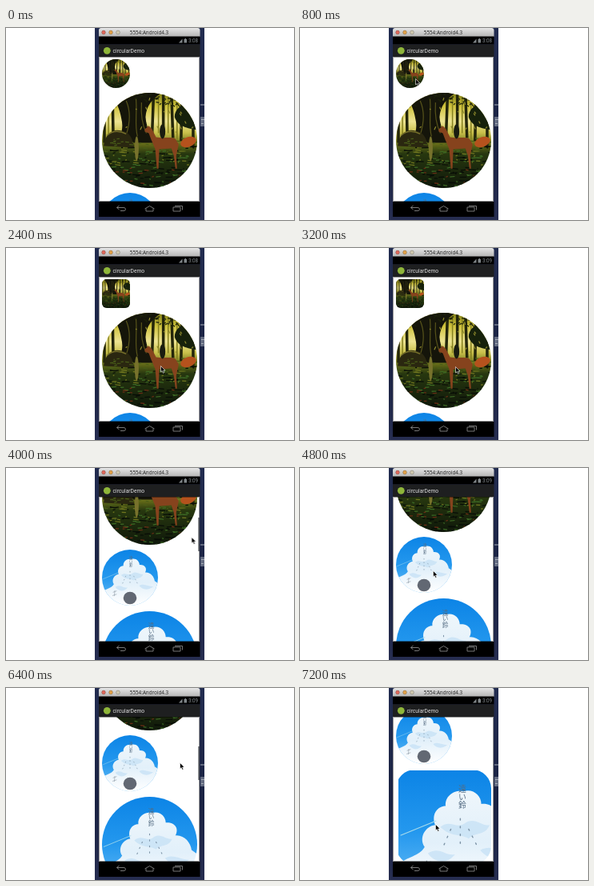
These frames come from a looping animation (360 by 240 pixels, 8000 ms). An HTML page:

```html
<!DOCTYPE html>
<html lang="en">
<head>
<meta charset="utf-8">
<title>circularDemo</title>
<style>
  html, body { margin: 0; width: 100%; height: 100%; overflow: hidden; background: #fff; }
  #stage { position: relative; width: 360px; height: 240px; overflow: hidden; }
  #stage > *, .pic, #list { position: absolute; }
  svg { display: block; }
  #desk { left: 111px; top: 0; width: 137px; height: 240px; background: linear-gradient(#222c50, #1a2242 60%, #262d50); }
  #view { left: 116px; top: 36px; width: 126px; height: 181px; overflow: hidden; background: #fff; }
  #list { left: 0; top: 0; }
  .pic { overflow: hidden; border-radius: 50%; }
  .pic svg { width: 100%; height: 100%; }
  .s1 { left: 4px; top: 3px; width: 35px; height: 36px; }
  .s2 { left: 4px; top: 45px; width: 119px; height: 119px; }
  .s3 { left: 4px; top: 170px; width: 70px; height: 70px; }
  .s4 { left: 4px; top: 247px; width: 119px; height: 119px; }
  #bar { left: 239.5px; top: 62px; width: 2.5px; height: 42px; background: #8d9095; }
  #chrome, #arrow { left: 0; top: 0; }

  #list, .s1, .s3, .s4, .zoom, #bar, #arrow, .before, .after {
    animation: 8s step-end infinite;
  }
  #list { animation-name: scroll; }
  .s1 { animation-name: square1; }
  .s3 { animation-name: square3; }
  .s4 { animation-name: square4; }
  .zoom { animation-name: zoom; }
  #bar { animation-name: bar; }
  #arrow { animation-name: point; }
  .before { animation-name: before; }
  .after { animation-name: after; }

  @keyframes scroll {
    0% { transform: none; }
    50% { transform: translateY(-104px); }
    60% { transform: translateY(-120px); }
    80% { transform: translateY(-147px); }
    90%, 100% { transform: translateY(-181px); }
  }
  @keyframes square1 { 0% { border-radius: 50%; } 20%, 100% { border-radius: 16%; } }
  @keyframes square3 { 0%, 80%, 100% { border-radius: 50%; } 70% { border-radius: 21%; } }
  @keyframes square4 { 0% { border-radius: 50%; } 90%, 100% { border-radius: 20%; } }
  @keyframes zoom { 0% { transform: none; } 90%, 100% { transform: translate(3px, 1px) scale(1.3); } }
  @keyframes bar {
    0%, 60%, 90%, 100% { opacity: 0; }
    50% { opacity: 1; }
    80% { opacity: 1; transform: translateY(11px); }
  }
  @keyframes point {
    0% { transform: translate(380px, 93px); }
    10% { transform: translate(144px, 63px); }
    20% { transform: translate(146px, 60px); }
    30% { transform: translate(193px, 147px); }
    40% { transform: translate(194px, 148px); }
    50% { transform: translate(231.5px, 86px); }
    60% { transform: translate(166px, 128px); }
    70% { transform: translate(164px, 128px); }
    80% { transform: translate(217px, 93px); }
    90%, 100% { transform: translate(169px, 170px); }
  }
  @keyframes before { 0% { opacity: 1; } 40%, 100% { opacity: 0; } }
  @keyframes after { 0% { opacity: 0; } 40%, 100% { opacity: 1; } }
</style>
</head>
<body>
<div id="stage">
  <div id="desk"></div>

  <div id="view">
    <div id="list">
      <div class="pic s1"><svg viewBox="0 0 118 118" preserveAspectRatio="none"><use href="#forest"/></svg></div>
      <div class="pic s2"><svg viewBox="0 0 118 118"><use href="#forest"/></svg></div>
      <div class="pic s3"><svg viewBox="0 0 118 118"><use href="#sky"/></svg></div>
      <div class="pic s4"><svg viewBox="0 0 118 118"><g class="zoom"><use href="#sky"/></g></svg></div>
    </div>
  </div>
  <div id="bar"></div>

  <svg id="chrome" width="360" height="240">
    <defs>
      <linearGradient id="metal" x2="0" y2="1">
        <stop stop-color="#e6e6e6"/><stop offset="1" stop-color="#b4b4b4"/>
      </linearGradient>
      <linearGradient id="glow" x2="0" y2="1">
        <stop stop-color="#7d7c14"/><stop offset=".14" stop-color="#cfc23c"/>
        <stop offset=".3" stop-color="#ece391"/><stop offset=".42" stop-color="#c9c04a"/>
        <stop offset=".54" stop-color="#636a18"/><stop offset=".64" stop-color="#27370f"/>
        <stop offset="1" stop-color="#0f180a"/>
      </linearGradient>
      <linearGradient id="blue" x2="0" y2="1">
        <stop stop-color="#0c84e6"/><stop offset=".5" stop-color="#2498ee"/>
        <stop offset="1" stop-color="#6fc0f6"/>
      </linearGradient>
      <linearGradient id="white" x2="0" y2="1">
        <stop stop-color="#eef6fb"/><stop offset=".5" stop-color="#e2f0fa"/>
        <stop offset="1" stop-color="#fff"/>
      </linearGradient>

      <g id="forest">
        <path fill="url(#glow)" d="M0 0H118V118H0Z"/>
        <path fill="none" stroke="#24260a" stroke-width="3.5"
          d="M3 0V62M13 0L14 58M64 0L62 54M76 0V52M86 0L88 56M99 0L98 60M113 0V68"/>
        <path fill="none" stroke="#85801f" stroke-width="1.5" d="M8 10V56M70 0V50M82 0V50M93 12V58"/>
        <path fill="#15150a" d="M16 62C24 54 27 44 24 32C22 20 18 10 8 0H74C62 8 55 16 54 30C55 44 60 52 72 62Z"/>
        <path fill="none" stroke="#56521a" stroke-width="1.2"
          d="M30 10C36 24 34 40 30 52M42 6C44 24 40 40 44 54M49 12C48 26 50 40 55 50"/>
        <path fill="#2a2710" d="M2 66C4 50 14 44 24 47C34 48 38 56 40 68Z"/>
        <path fill="none" stroke="#77702a" stroke-width="1.5" d="M6 53Q16 44 30 51"/>
        <path fill="#16210b" d="M90 30C90 18 102 12 112 16L118 20V46C106 44 94 42 90 30Z"/>
        <g id="specks"></g>
        <path fill="#86431d" d="M53 45L58 41L62 45L67 55C76 57 84 54 91 57L95 64L92 78L93 94H91L89 78L86 69L71 70L70 94H68L66 70L61 58L58 50L53 48Z"/>
        <ellipse cx="107" cy="61" rx="10" ry="6" fill="#b5521d" transform="rotate(-20 107 61)"/>
        <ellipse cx="75" cy="48" rx="3.5" ry="9" fill="#1a1d10"/>
        <ellipse cx="43" cy="69" rx="2.5" ry="15" fill="#77722c"/>
      </g>

      <g id="sky">
        <path fill="url(#blue)" d="M0 0H118V118H0Z"/>
        <path fill="url(#white)" d="M0 90C8 82 20 82 25 73C19 64 26 53 35 52C31 41 38 34 45 34C44 24 54 18 62 20C71 17 79 24 79 32C90 31 96 39 91 48C102 47 110 57 111 66L118 71V118H0Z"/>
        <path fill="#c3e0f5" opacity=".7" d="M40 54C50 46 55 57 64 50C73 44 80 54 87 52C82 63 74 58 67 65C58 60 50 64 40 54ZM28 79C40 72 44 82 54 80C46 90 34 88 28 79ZM78 76C88 70 98 78 108 78C98 86 86 86 78 76Z"/>
        <path fill="none" stroke="#a8dcec" stroke-width=".8" d="M2 62L36 48"/>
        <path fill="none" stroke="#7f95a8" stroke-width="1.1" stroke-linecap="round" stroke-dasharray="1.4 6"
          d="M59 46V74M50 56L43 72M67 56L75 72"/>
        <path fill="none" stroke="#8d9aa6" stroke-width="1" d="M23 90L31 87M27 86L26 98M22 97L31 94"/>
        <ellipse cx="59" cy="102" rx="14" ry="13" fill="#626873"/>
        <text x="61" y="14" font-size="7.5" fill="#536b82" writing-mode="vertical-rl"
          font-family="'Noto Sans CJK JP', 'Noto Sans CJK', sans-serif">遠い鈴</text>
      </g>
    </defs>

    <path fill="url(#metal)" d="M116 11V3Q116 0 119 0H239.5Q242.5 0 242.5 3V11Z"/>
    <g stroke-width=".5" stroke="#0006">
      <circle cx="122" cy="5.5" r="2.4" fill="#e0695c"/>
      <circle cx="131" cy="5.5" r="2.4" fill="#e2a24a"/>
      <circle cx="140" cy="5.5" r="2.4" fill="#cfc8b0"/>
    </g>
    <text x="179" y="8" text-anchor="middle" font-size="6.3" font-weight="500" fill="#222"
      font-family="'Open Sans', sans-serif">5554:Android4.3</text>

    <path d="M116 10.5H242.5V20.5H116Z"/>
    <path fill="#1e1f20" d="M116 20.5H242.5V36H116Z"/>
    <path fill="#808689" d="M216 18.5L220.5 13.5V18.5ZM222.5 14H223.5V13H225V14H226V18.5H222.5Z"/>
    <g font-family="Roboto, sans-serif">
      <g font-size="6.3" fill="#858c90">
        <text class="before" x="228" y="18.3">3:08</text>
        <text class="after" x="228" y="18.3">3:09</text>
      </g>
      <text x="133.5" y="30.6" font-size="6.7" fill="#dedede">circularDemo</text>
    </g>
    <circle cx="126.3" cy="28.3" r="4.4" fill="#8fb63a"/>

    <path d="M116 217H242.5V236H116Z"/>
    <path fill="none" stroke="#000" stroke-opacity=".4" d="M116.5 36.5H241.5V216.5H116.5Z"/>
    <g fill="none" stroke="#858585" stroke-width=".9">
      <path d="M141.5 222L138.5 224.5L141.5 227M138.5 224.5H147Q149.5 224.5 149.5 226.5T147 228.5H143"/>
      <path d="M173.5 226L179.5 222.5L185.5 226M175 225.5V229H184V225.5"/>
      <path d="M209 224H218V229H209ZM211 222.5H220.5V227.5"/>
    </g>

    <path fill="#626a80" d="M243 95H248V97H243ZM243 111H248V123H243Z"/>
    <path fill="none" stroke="#a3a9b5" d="M244 114.5H248M244 119.5H247"/>
  </svg>

  <svg id="arrow" width="10" height="12">
    <path d="M.5 .5V8L2.2 6.5L3.4 9.3L4.8 8.7L3.6 6H6Z" stroke="#fff" stroke-width=".6"/>
  </svg>
</div>

<script>
  let seed = 7;
  const rand = (a, b) => {
    seed = (seed * 16807) % 2147483647;
    return a + (b - a) * seed / 2147483647;
  };

  // Scatter short strokes of one colour between two heights.
  function scatter(color, count, top, bottom, dx, dy) {
    let d = '';
    for (let i = 0; i < count; i++) {
      const x = rand(0, 118).toFixed(1), y = rand(top, bottom).toFixed(1);
      d += `M${x} ${y}l${rand(1, dx).toFixed(1)} ${rand(-dy, dy).toFixed(1)}`;
    }
    const path = document.createElementNS('http://www.w3.org/2000/svg', 'path');
    path.setAttribute('d', d);
    path.setAttribute('stroke', color);
    path.setAttribute('stroke-width', 1.2);
    document.getElementById('specks').append(path);
  }

  scatter('#1b2008', 90, 0, 16, 5, 3);
  scatter('#8f8a2c', 30, 4, 50, 2, 4);
  scatter('#485c18', 60, 56, 76, 6, 1);
  scatter('#070c06', 90, 66, 118, 10, 1);
  scatter('#3c6a24', 70, 72, 118, 7, 1);
  scatter('#70761f', 30, 68, 92, 7, 1);
  scatter('#6b2c14', 24, 92, 116, 6, 1);
</script>
</body>
</html>
```
